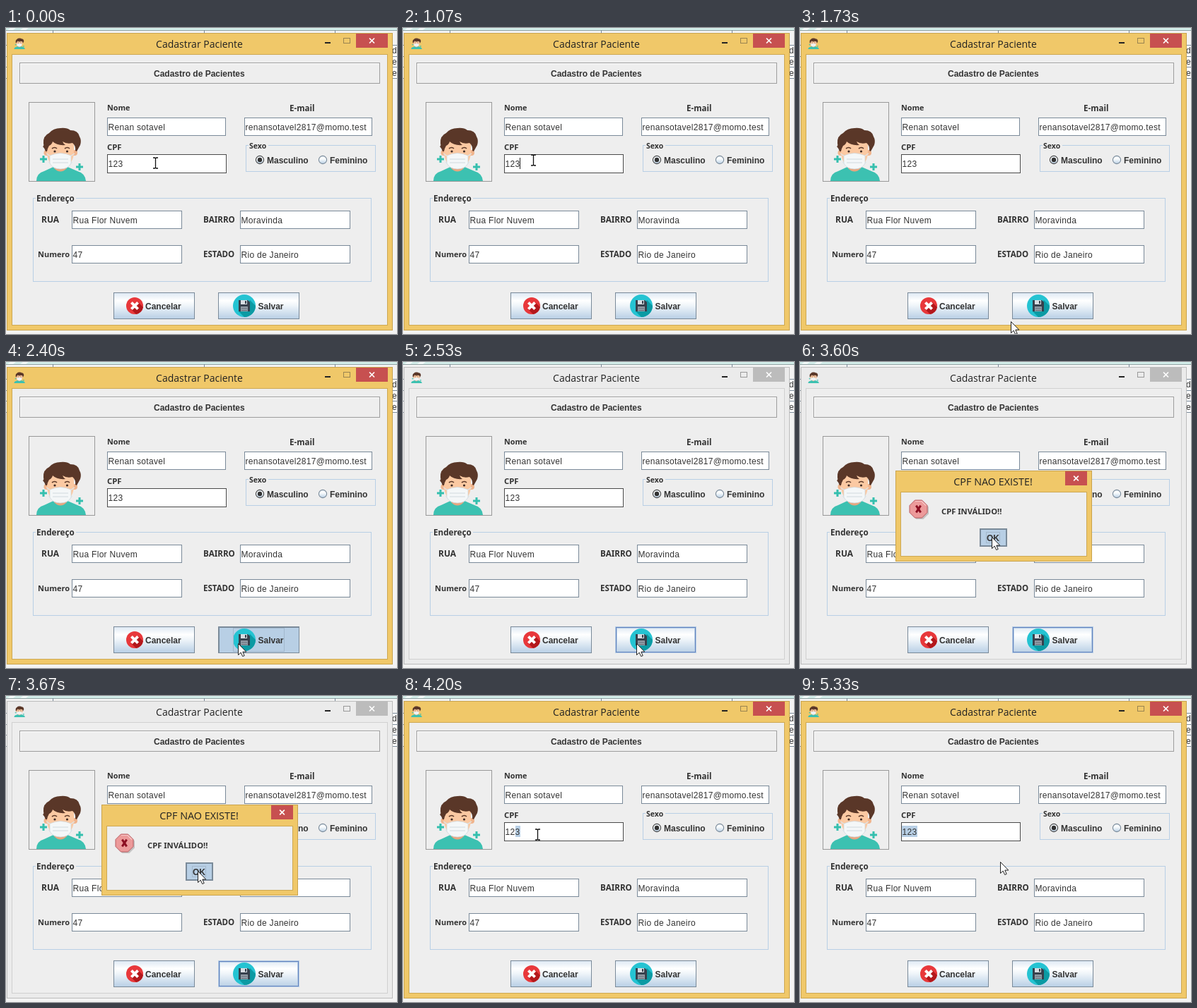
Recreate the animation shown at these times as an HTML page. Size 553 by 434 pixels, loop 5.39 s.

```html
<!DOCTYPE html>
<html lang="pt-BR">
<head>
<meta charset="utf-8">
<title>Cadastrar Paciente</title>
<style>
  html, body { margin: 0; width: 100%; height: 100%; overflow: hidden; background: #f3f3f3; }
  svg { display: block; width: 553px; height: 434px; }
  text { fill: #333; white-space: pre; }
  .value { font: 12px "Liberation Sans", Arial, sans-serif; letter-spacing: .3px; }
  .bold { font: bold 12px "Liberation Sans", Arial, sans-serif; }
  .label { font-family: "Noto Sans", "Open Sans", sans-serif; font-weight: bold; }
  .title { font-family: "Open Sans", "Noto Sans", sans-serif; text-anchor: middle; fill: #222; }
</style>
</head>
<body>
<svg id="stage" viewBox="0 0 553 434" xmlns="http://www.w3.org/2000/svg"></svg>
<script>
const LOOP = 5390;
const FPS = 15;
const GOLD = '#f0c869';
const BLUE = '#b8cfe5';
const STEEL = '#7a8a99';

// Drawing helpers; outlines are aligned to whole pixels
const rect = (x, y, w, h, fill, extra = '') =>
  `<rect x="${x}" y="${y}" width="${w}" height="${h}" fill="${fill}" ${extra}/>`;
const box = (x, y, w, h, fill, stroke, extra = '') =>
  rect(x + .5, y + .5, w - 1, h - 1, fill, `stroke="${stroke}" ${extra}`);
const path = (d, fill, extra = '') => `<path d="${d}" fill="${fill}" ${extra}/>`;
const circle = (x, y, r, fill, extra = '') =>
  `<circle cx="${x}" cy="${y}" r="${r}" fill="${fill}" ${extra}/>`;
const text = (x, y, cls, str, extra = '') =>
  `<text x="${x}" y="${y}" class="${cls}" ${extra}>${str}</text>`;
const label = (x, y, size, str) => text(x, y, 'label', str, `font-size="${size}"`);
const cross = (x, y, rx, ry, color, width) =>
  path(`M${x - rx} ${y - ry}l${2 * rx} ${2 * ry}m0 ${-2 * ry}l${-2 * rx} ${2 * ry}`, 'none',
    `stroke="${color}" stroke-width="${width}"`);
const plus = (x, y, r) =>
  path(`M${x - r} ${y}h${2 * r}M${x} ${y - r}v${2 * r}`, 'none', 'stroke="#35bfae" stroke-width="3"');

const fields = [
  [143, 127, 168, 26, 'Renan sotavel'],
  [337, 127, 181, 26, 'renansotavel2817@momo.test'],
  [143, 179, 169, 27, ''],
  [93, 259, 156, 26, 'Rua Flor Nuvem'],
  [331, 259, 156, 26, 'Moravinda'],
  [93, 308, 156, 26, '47'],
  [331, 308, 156, 26, 'Rio de Janeiro'],
];

const field = ([x, y, w, h, str]) =>
  box(x, y, w, h, '#fff', str ? STEEL : '#4a4a4a') + text(x + 1.5, y + 18, 'value', str);

const group = (x, y, w, h, gap, name, size) =>
  box(x, y, w, h, 'none', BLUE) + rect(x + 4, y - 2, gap, 5, '#eee') + label(x + 5, y + 5, size, name);

const radio = (x, y, on) =>
  circle(x, y, 5.6, 'url(#metal)', `stroke="${on ? '#444' : STEEL}" stroke-width="1.1"`) +
  (on ? circle(x, y, 3.2, '#333') : '');

const button = (id, x, y, w, h) =>
  box(x, y, w, h, 'url(#metal)', STEEL, `id="${id}"`);

function backdrop() {
  let s = rect(0, 0, 553, 434, '#f3f3f3') + rect(0, 0, 553, 3, '#d3eeea') +
    rect(0, 3, 553, 1, '#8fa3a3') + path('M6 0h8l-4 3h-8zM24 0h8l-4 3h-8z', '#f4fbfa') +
    rect(0, 25, 553, 47, '#fff');
  for (const y of [24, 40, 55, 71]) s += rect(0, y, 553, 1, STEEL);
  for (const x of [66, 280, 465]) s += rect(x, 3, 1, 5, STEEL);
  ['d', 'e', 'e'].forEach((c, i) => s += text(546, 36 + 16 * i, 'value', c));
  return s;
}

function person() {
  return path('M43 217q0-11 11-14l13-6h20l14 6q11 3 12 14z', '#3cc1b1') +
    path('M68 190h18v9q-9 9-18 0z', '#e8a67f') +
    circle(57.5, 177, 4, '#f0b48c') + circle(97, 177, 4, '#f0b48c') +
    path('M58 162q0-8 19-8t19 8v16q-2 19-19 20-17-1-19-20z', '#fbc9a2') +
    path('M56 175q-1-4-4-7 2-1 1-4-1-11 8-15 6-7 16-7 9-1 14 3 11 0 13 9 3 5 1 12l-5 9-2-1q1-7-4-11-8 2-14-2 1 3 4 5-12 1-18-5-1 4-5 6-2 3-3 8z', '#5a3728') +
    path('M65 171q4-3 7 0m11 0q4-3 7 0', 'none', 'stroke="#5a3728" stroke-width="1.6"') +
    circle(69, 175, 1.6, '#3d2a25') + circle(86.5, 175, 1.6, '#3d2a25') +
    path('M57 178l6 4m34-4l-6 4M60 190l5 4m29-4l-5 4', 'none', 'stroke="#dfe6ea" stroke-width="1.3"') +
    path('M62 181q15-7 30 0v11q-4 8-15 8t-15-8z', '#f4f7f8', 'stroke="#ccd6dc" stroke-width=".7"') +
    path('M66 186h22m-22 5h22', 'none', 'stroke="#d0d9de"') +
    plus(53, 186, 5) + plus(104, 197, 5);
}

function mainWindow() {
  let s = box(1, 7, 546, 422, GOLD, '#c9a34c', 'id="frame"') +
    box(8, 37, 532, 385, '#eee', '#cda853', 'id="client"') +
    text(273.5, 28, 'title', 'Cadastrar Paciente', 'font-size="14"') +
    rect(451, 20, 8, 2, '#222') +
    box(477, 14, 10, 8, 'none', '#9a8450', 'id="maximize"') +
    rect(495, 8, 45, 20, '#c75050', 'id="close"') + cross(517.5, 18, 3.5, 3.5, '#fff', 1.7) +
    `<g transform="translate(2 -14.5) scale(.22 .205)">${person()}</g>`;
  s += box(19, 49, 510, 30, '#eee', '#9d9d9d') + path('M20.5 78V50.5H528', 'none', 'stroke="#fff"') +
    text(209, 69, 'bold', 'Cadastro de Pacientes') +
    box(32, 105, 94, 113, '#eee', '#999') + person() +
    label(143, 117, 10.8, 'Nome') + label(401, 118, 11.5, 'E-mail') + label(143, 173, 11.3, 'CPF') +
    group(339, 166, 184, 38, 28, 'Sexo', 10.5) +
    radio(359, 187, true) + text(369, 192, 'bold', 'Masculino') +
    radio(448, 187, false) + text(458, 192, 'bold', 'Feminino') +
    group(38, 241, 479, 119, 57, 'Endereço', 11.7) +
    label(50, 276, 12, 'RUA') + label(279, 276, 11.6, 'BAIRRO') +
    label(45, 325, 11, 'Numero') + label(279, 325, 11.5, 'ESTADO') +
    fields.map(field).join('') +
    rect(144, 184, 22, 16, BLUE, 'id="selection"') + text(144.5, 197, 'value', '123') +
    rect(165, 184, 1, 16, '#222', 'id="caret"');
  s += button('cancel', 152, 375, 115, 38) + circle(182, 394, 12, '#e8383b') +
    path('M187 389l7 7A12.2 12.2 0 0 1 184 406l-7-7z', '#b3181c') +
    cross(182, 394, 4.6, 4.6, '#fff', 4) + text(197, 399, 'bold', 'Cancelar');
  s += button('save', 300, 375, 115, 38) +
    `<g id="hover">${box(301, 376, 113, 36, 'none', '#6382bf') + box(302, 377, 111, 34, 'none', BLUE)}</g>` +
    path('M301.5 412V376.5H414', 'none', `stroke="${STEEL}" id="sunken"`) +
    circle(337, 394, 16, '#25c3d2') +
    path('M345 386l8 8A16 16 0 0 1 337 410l-8-8z', '#0c9aa3') +
    path('M329 386h13l3 3v13h-16z', '#37414d') + rect(332, 386, 9, 6, '#d8dde2') +
    rect(338, 387, 2, 4, '#37414d') + rect(332, 395, 10, 7, '#929ba5') +
    path('M333 397.5h8m-8 3h8', 'none', 'stroke="#6a747f"') +
    text(356.5, 399, 'bold', 'Salvar') +
    box(321, 377, 73, 34, 'none', '#a3b8cc', 'id="focus"');
  return s;
}

function dialog() {
  const octagon = 'M162.5 196h10l7.5 7.5v10l-7.5 7.5h-10l-7.5-7.5v-10z';
  return '<g id="dialog">' +
    box(135, 154, 278, 129, GOLD, '#c9a34c') + box(142, 184, 264, 92, '#eee', '#cda853') +
    text(273, 175, 'title', 'CPF NAO EXISTE!', 'font-size="14.4"') +
    rect(375, 155, 31, 20, '#c75050') + cross(390.5, 165, 3.4, 3.4, '#fff', 1.6) +
    path(octagon, '#c4c4c4', 'transform="translate(2 2)"') +
    path(octagon, '#ec9a9a', 'stroke="#b85a5f"') +
    path('M163 197.5h9l6 6', 'none', 'stroke="#f9caca" stroke-width="1.2"') +
    cross(167.5, 208.5, 3.2, 4.8, '#8c0f22', 3) +
    label(200, 216, 11.2, 'CPF INVÁLIDO!!') +
    button('ok', 254, 236, 39, 26) + box(255, 237, 37, 24, 'none', STEEL) +
    text(264, 254, 'bold', 'OK') + box(263, 241, 20, 16, 'none', '#a3b8cc') + '</g>';
}

const stage = document.getElementById('stage');
stage.innerHTML = `<defs><linearGradient id="metal" x2="0" y2="1">
  <stop stop-color="#dde8f3"/><stop offset=".3" stop-color="#fff"/>
  <stop offset=".5" stop-color="#eef4f9"/><stop offset="1" stop-color="${BLUE}"/>
</linearGradient></defs>` + backdrop() + mainWindow() + dialog() +
  path('M0 0V16L3.7 12.6 6.2 18 8.7 17 6.3 11.6H11.3z', '#fff', 'id="arrow" stroke="#222" stroke-width="1"') +
  path('M-3.5-7.5H-1L0-6.5 1-7.5H3.5M0-6.5V6.5M-3.5 7.5H-1L0 6.5 1 7.5H3.5', 'none',
    'id="beam" stroke="#111" stroke-width="1.3"');

const el = {};
stage.querySelectorAll('[id]').forEach(n => el[n.id] = n);

// Pointer path: time, x, y
const route = [
  [330, 211, 191], [530, 150, 190], [670, 126, 184], [800, 140, 186], [930, 174, 189],
  [1070, 184, 187], [1200, 184, 187], [1400, 95, 240], [1530, 150, 350], [1730, 298, 416],
  [1800, 298, 416], [2270, 328, 399], [2470, 328, 399], [2730, 337, 397], [2870, 338, 396],
  [3070, 354, 370], [3330, 275, 252], [3400, 271, 240], [3600, 271, 248], [3730, 271, 248],
  [4000, 215, 198], [4070, 204, 196], [4200, 190, 196], [4530, 140, 193], [4600, 140, 193],
  [4800, 119, 191], [4930, 119, 191], [5330, 283, 235],
];

function pointer(t) {
  const i = route.findIndex(k => k[0] >= t);
  if (i < 1) return (i ? route[route.length - 1] : route[0]).slice(1);
  const [t0, x0, y0] = route[i - 1], [t1, x1, y1] = route[i];
  const p = (t - t0) / (t1 - t0);
  return [x0 + (x1 - x0) * p, y0 + (y1 - y0) * p];
}

const within = (t, a, b) => t >= a && t < b;
const show = (node, on) => node.setAttribute('visibility', on ? 'visible' : 'hidden');
const paint = (node, fill, stroke) => {
  node.setAttribute('fill', fill);
  if (stroke) node.setAttribute('stroke', stroke);
};

function dialogOpacity(t) {
  if (!within(t, 2600, 3800)) return 0;
  if (t < 2670) return .4;
  if (t < 2730) return .8;
  return t < 3730 ? 1 : .5;
}

function update(ms) {
  const frame = Math.floor((ms % LOOP + 4) * FPS / 1000);
  const t = Math.round(frame * 100 / FPS) * 10;

  const active = !within(t, 2530, 3730);
  paint(el.frame, active ? GOLD : '#ebebeb', active ? '#c9a34c' : '#bcbcbc');
  paint(el.client, '#eee', active ? '#cda853' : '#d0d0d0');
  paint(el.maximize, 'none', active ? '#9a8450' : '#999');
  paint(el.close, active ? '#c75050' : '#bcbcbc');

  const pressed = within(t, 2270, 2530);
  const hover = within(t, 2130, 3800) && !pressed;
  paint(el.save, pressed ? BLUE : 'url(#metal)', hover ? BLUE : STEEL);
  show(el.hover, hover);
  show(el.sunken, pressed);
  show(el.focus, pressed || within(t, 3730, 4130));
  paint(el.ok, within(t, 3530, 3730) ? BLUE : 'url(#metal)');

  const opacity = dialogOpacity(t);
  const scale = .9 + .1 * opacity;
  show(el.dialog, opacity > 0);
  el.dialog.setAttribute('opacity', opacity);
  el.dialog.setAttribute('transform', `translate(274 218) scale(${scale}) translate(-274 -218)`);

  show(el.caret, within(t, 70, 600) || within(t, 930, 1530) || within(t, 1930, 2270));
  const chars = t < 4200 ? 0 : t < 4270 ? 1 : t < 4400 ? 2 : 3;
  const left = chars === 3 ? 144 : 166 - 7 * chars;
  el.selection.setAttribute('x', left);
  el.selection.setAttribute('width', 166 - left);

  const [x, y] = pointer(t);
  const dragging = within(t, 4070, 5000);
  const overField = opacity === 0 &&
    fields.some(([fx, fy, w, h]) => within(x, fx, fx + w) && within(y, fy, fy + h));
  const beam = dragging || overField;
  show(el.beam, beam);
  show(el.arrow, !beam);
  const place = `translate(${Math.round(x) + .5} ${Math.round(y) + .5})`;
  el.beam.setAttribute('transform', place);
  el.arrow.setAttribute('transform', place);
}

const start = performance.now();
function tick() {
  update(performance.now() - start);
  requestAnimationFrame(tick);
}
update(0);
requestAnimationFrame(tick);
</script>
</body>
</html>
```
